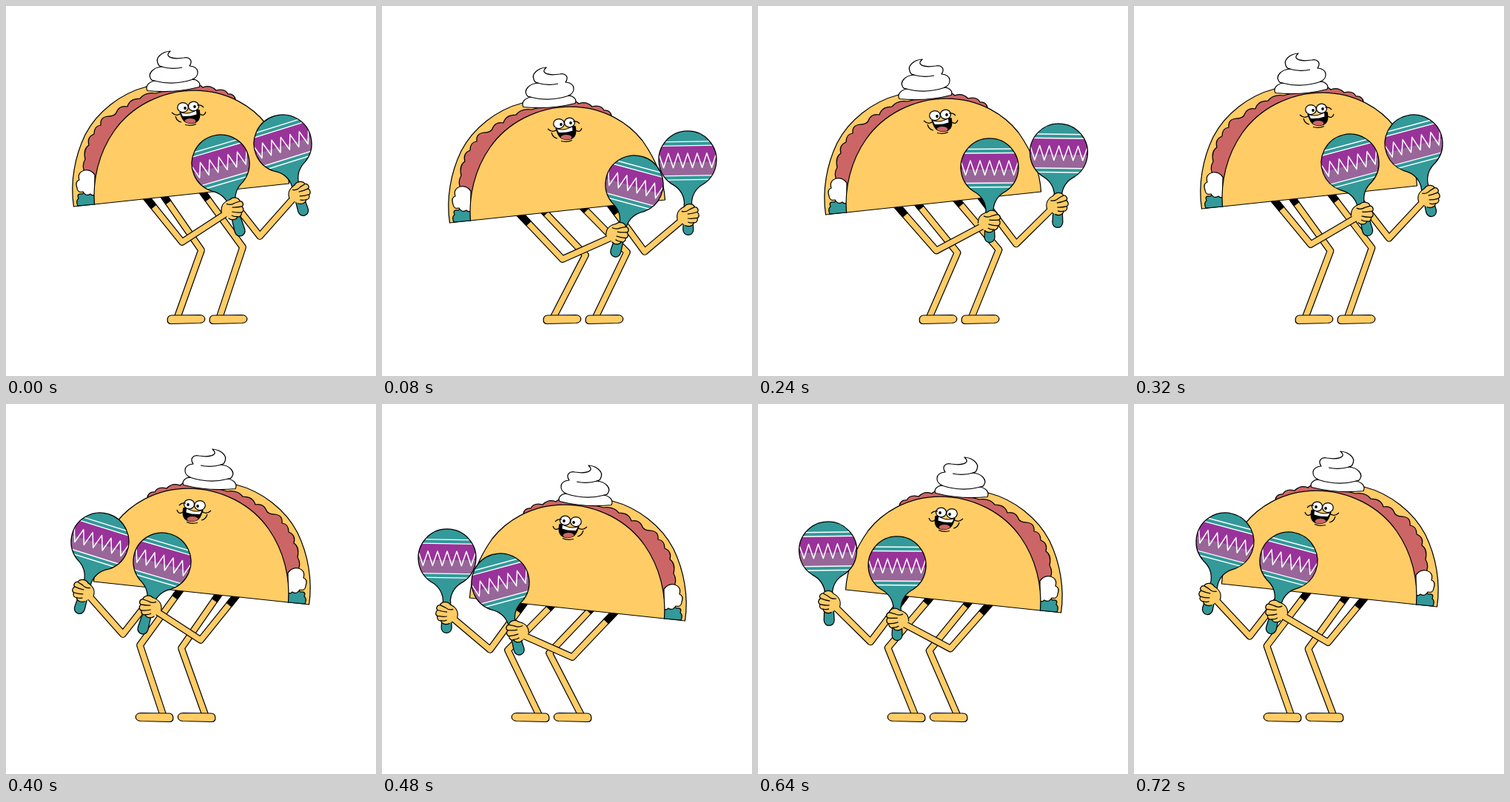
These frames come from a looping animation (500 by 500 pixels, 0.8 s). An HTML page with a canvas:

```html
<!DOCTYPE html>
<html lang="en">
<head>
<meta charset="utf-8">
<title>Dancing taco</title>
<style>
  html, body { margin: 0; width: 100%; height: 100%; overflow: hidden; background: #fff; }
  canvas { display: block; width: 500px; height: 500px; }
</style>
</head>
<body>
<canvas id="stage" width="500" height="500"></canvas>
<script>
const ctx = document.getElementById('stage').getContext('2d');

const YELLOW = '#ffcc66', RED = '#cc6666', TEAL = '#339999';
const PURPLE = '#993399', MAUVE = '#996699', WHITE = '#fff', BLACK = '#000';
const LINE = 1.25, STEP = 80;

// Front and back limbs follow the dip of the body; only the maracas are posed.
// near/far: hand x, y, maraca x, y, tilt in degrees
const poses = [
  { dip: 0,  near: [305.5, 274, 290, 213, -16], far: [396, 253, 374, 186, -17] },
  { dip: 22, near: [317.5, 307, 341, 241, 15.5], far: [413, 283, 413, 208, -0.5] },
  { dip: 18, near: [316, 302, 333, 232, 12],    far: [414, 280, 431, 206, 14] },
  { dip: 11, near: [312, 291, 313, 218, 0],     far: [404, 268, 406.5, 198, 1] },
  { dip: 3,  near: [308, 280, 292, 212, -14.5], far: [398, 258, 378, 186, -14.5] }
];

const P = d => new Path2D(d);
const shape = {
  back: P('M91.5 271 C86.5 238 93 203 107 174 C123 143 155 118 190 109 L240 106 L255 120 L119 268 Z'),
  meat: P('M108 228 Q101 217 107 207 Q104 193 112 188 Q109 177 119 173 Q119 162 128 161 Q127 150 138 149 Q148 149 150 142 Q154 134 164 136 Q167 125 181 125 Q188 116 202 118 L240 108 Q258 102 266 110 Q276 106 284 114 Q296 111 300 119 Q308 118 310 126 L250 140 L124 240 Z'),
  cheese: P('M120 255 L120 228 Q114 220 106 222 Q96 225 99 235 Q93 237 96 246 Q97 253 104 251 Q108 258 114 254 Q117 257 120 255 Z'),
  lettuce: P('M97 270 Q94 263 98 260 Q95 253 103 254 Q108 249 112 254 Q116 250 120 253 L120 268 Z'),
  front: P('M119.5 268 C117 235 125 199 146 169 C169 136 210 114 255 114 C300 114 334 137 352 160 C371 187 381 213 382.5 240 Z'),
  cream: P('M222 61 C210 62 202 70 205 77 C206 80 208 82 211 82 C198 83 191 92 196 99 C197 101 199 101 201 101 C192 103 188 109 191 114.5 Q228 118 261 109.5 C264 105 259 99 252 99 C262 95 262 82 248 81 C253 74 248 68 240 70 C228 72 212 70 222 61 Z'),
  creamFolds: P('M210 82 Q224 86 238 83 M200 101 Q226 108 253 99'),
  mouth: P('M235 143.5 Q247 148 258 140 L261 140.5 Q265 158 250 158.5 C240 158.5 238 152 235 143.5 Z'),
  teeth: P('M236.5 144.5 Q248 147.5 257 141 L257.5 146.5 Q249 149.5 239 149 Z'),
  cheeks: P('M224 144 Q230 150 237 145 M229 149 Q231 156 237 157 M258 134 Q264 133 267 137 M262 146 Q268 150 270 143 M242 160.5 Q250 162.5 257 159.5'),
  foot: P('M223 418 L262 417.5 C271 418 271 428 262 428.5 L223 429.5 C216 429 217 419 223 418 Z'),
  gourd: P('M-22 32.2 A39 39 0 1 1 22 32.2 C11 38 6 46 5 57 L7 94 C7 104 -7 104 -7 94 L-5 57 C-6 46 -11 38 -22 32.2 Z'),
  hand: P('M-14 5 C-16 -5 -9 -10 -4 -12 C0 -17 8 -16 10 -11 C14 -11 16 -6 13 -4 C16 -2 16 3 13 4 C14 8 11 11 8 10 C7 15 0 16 -4 13'),
  fingers: P('M-8 -6 Q-2 -4 3 -8 L10 -11 M0 -2 Q6 -2 13 -4 M0 4 Q6 5 13 4 M0 9 Q4 11 8 10')
};

function zigzag() {
  const path = new Path2D();
  for (let i = -6; i <= 6; i++) path.lineTo(i * 6.5, i % 2 ? 10.5 : -9);
  return path;
}
const zig = zigzag();

function ink(path, fill) {
  if (fill) { ctx.fillStyle = fill; ctx.fill(path); }
  ctx.strokeStyle = BLACK;
  ctx.lineWidth = LINE;
  ctx.stroke(path);
}

function dot(x, y, rx, ry, fill) {
  const path = new Path2D();
  path.ellipse(x, y, rx, ry, 0, 0, Math.PI * 2);
  ink(path, fill);
}

function at(x, y, angle, draw) {
  ctx.save();
  ctx.translate(x, y);
  ctx.rotate(angle);
  draw();
  ctx.restore();
}

function rule(x1, y1, x2, y2, width, color) {
  ctx.strokeStyle = color;
  ctx.lineWidth = width;
  ctx.beginPath();
  ctx.moveTo(x1, y1);
  ctx.lineTo(x2, y2);
  ctx.stroke();
}

// Two-part limb with a black cuff of the given length at the top
function limb([x, y], [jx, jy], [ex, ey], cuff) {
  const len = Math.hypot(jx - x, jy - y);
  const ux = (jx - x) / len, uy = (jy - y) / len;
  const path = new Path2D();
  path.moveTo(x - ux * 14, y - uy * 14);
  path.lineTo(jx, jy);
  path.lineTo(ex, ey);
  for (const [width, color] of [[9.8, BLACK], [7.4, YELLOW]]) {
    ctx.lineWidth = width;
    ctx.strokeStyle = color;
    ctx.stroke(path);
  }
  rule(x - ux * 14, y - uy * 14, x + ux * cuff, y + uy * cuff, 9.8, BLACK);
}

function drawFeet() {
  ink(shape.foot, YELLOW);
  at(57, 0, 0, () => ink(shape.foot, YELLOW));
}

function drawBody() {
  ink(shape.back, YELLOW);
  ink(shape.meat, RED);
  ink(shape.lettuce, TEAL);
  ink(shape.cheese, WHITE);
  ink(shape.front, YELLOW);
  ink(shape.cream, WHITE);
  ink(shape.creamFolds);

  ink(shape.mouth, BLACK);
  ctx.save();
  ctx.clip(shape.mouth);
  dot(249, 155.5, 8, 4.2, RED);
  ctx.restore();
  ctx.fillStyle = WHITE;
  ctx.fill(shape.teeth);
  dot(239, 137, 7.3, 6.5, WHITE);
  dot(253.5, 135.5, 7, 6.3, WHITE);
  dot(242, 138, 1.2, 1.4, BLACK);
  dot(255, 136, 1.2, 1.4, BLACK);
  ink(shape.cheeks);
}

function drawMaraca([, , x, y, tilt]) {
  at(x, y, tilt * Math.PI / 180, () => {
    ctx.fillStyle = TEAL;
    ctx.fill(shape.gourd);
    ctx.save();
    ctx.clip(shape.gourd);
    ctx.fillStyle = PURPLE;
    ctx.fillRect(-40, -19, 80, 22);
    ctx.fillStyle = MAUVE;
    ctx.fillRect(-40, 3, 80, 18);
    for (const line of [-24.5, -19, 21.5, 27]) rule(-40, line, 40, line - 0.5, 1.4, WHITE);
    ctx.lineWidth = 1.5;
    ctx.stroke(zig);
    ctx.restore();
    ink(shape.gourd);
  });
}

function drawHand([x, y], [ex, ey]) {
  at(x, y, Math.atan2(y - ey, x - ex) + 0.66, () => {
    ink(shape.hand, YELLOW);
    ink(shape.fingers);
  });
}

function render({ dip, near, far }) {
  const nearElbow = [238 + 0.27 * dip, 319 + 1.05 * dip];
  const farElbow = [343 + 0.54 * dip, 311 + 0.95 * dip];
  const bend = [0.5 * dip, 0.3 * dip];
  const wrist = ([x, y]) => [x - 6, y + 5];

  limb([303 + 0.3 * dip, 260 + 0.45 * dip], farElbow, wrist(far), 13);
  limb([269 + 0.1 * dip, 256 + 0.72 * dip], [320 + bend[0], 326 + bend[1]], [288.5, 421], 7);
  limb([215.5 + 0.08 * dip, 260 + 0.72 * dip], [264 + bend[0], 330 + bend[1]], [231.5, 421], 7);
  drawFeet();
  limb([193 - 0.1 * dip, 263 + 1.05 * dip], nearElbow, wrist(near), 11);
  at(0, dip, 0, drawBody);
  drawMaraca(far);
  drawHand(far, farElbow);
  drawMaraca(near);
  drawHand(near, nearElbow);
}

function tick(now) {
  const step = Math.floor(now / STEP) % (poses.length * 2);
  ctx.setTransform(1, 0, 0, 1, 0, 0);
  ctx.fillStyle = WHITE;
  ctx.fillRect(0, 0, 500, 500);
  // The second half of the dance is the first one mirrored
  if (step >= poses.length) ctx.setTransform(-1, 0, 0, 1, 501, 0);
  ctx.lineJoin = 'round';
  render(poses[step % poses.length]);
  requestAnimationFrame(tick);
}
tick(0);
</script>
</body>
</html>
```
